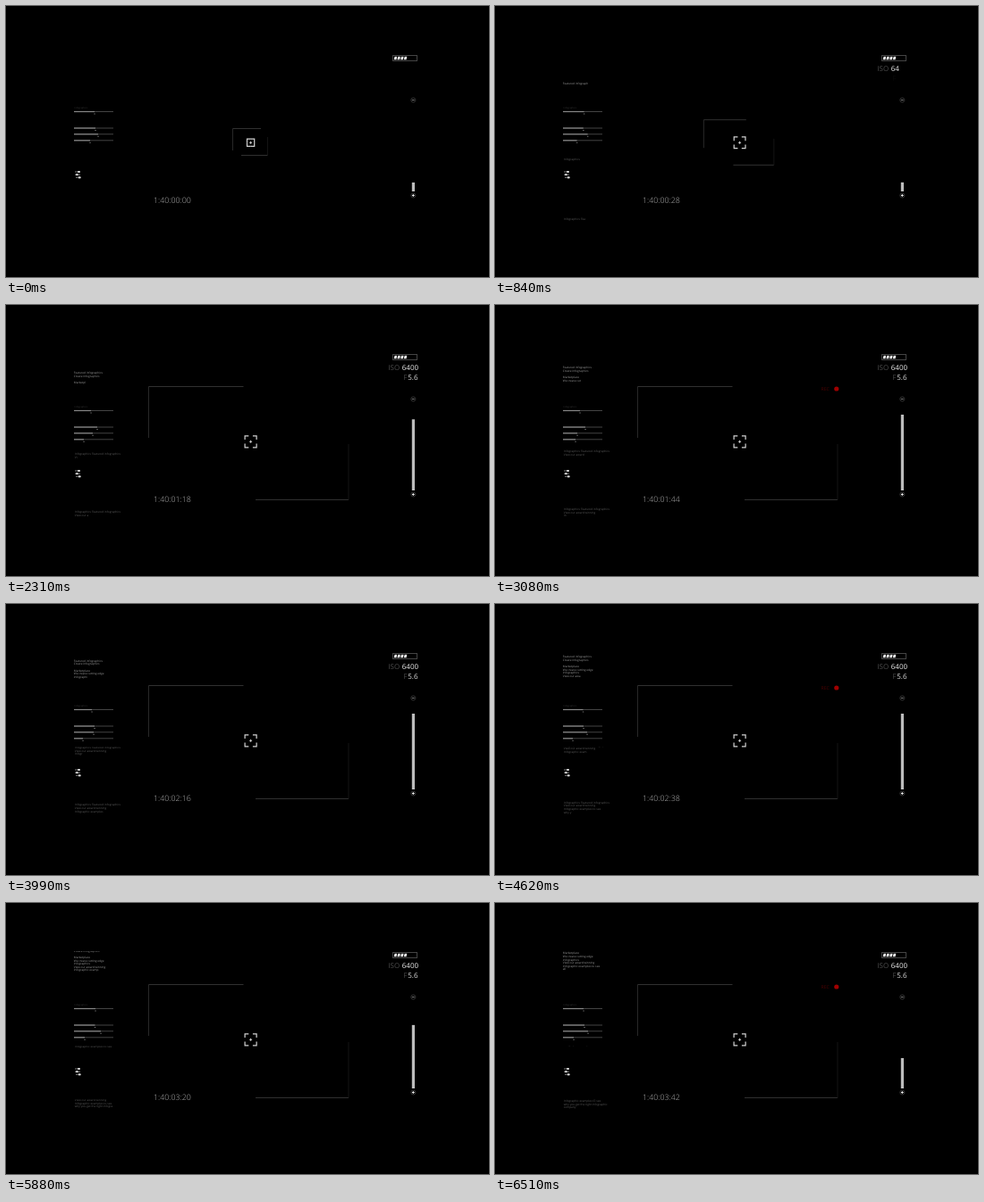
These frames come from a looping animation (540x304 px, 6580 ms). An HTML page with a canvas:

```html
<!DOCTYPE html>
<html lang="en">
<head>
<meta charset="utf-8">
<title>Camera viewfinder</title>
<style>
html, body { margin: 0; width: 100%; height: 100%; overflow: hidden; background: #000; }
canvas { display: block; }
</style>
</head>
<body>
<canvas id="view" width="540" height="304"></canvas>
<script>
const ctx = document.getElementById('view').getContext('2d');
const LOOP = 6580, STEP = 70;
const FONT = '"Open Sans", "Noto Sans", sans-serif';

const clamp = v => Math.max(0, Math.min(1, v));
const lerp = (a, b, p) => a + (b - a) * p;
const span = (t, from, to) => clamp((t - from) / (to - from));
const inOut = p => p < .5 ? 4 * p ** 3 : 1 - 4 * (1 - p) ** 3;

function rect(x, y, w, h, color) {
  ctx.fillStyle = color;
  ctx.fillRect(x, y, w, h);
}

function path(points, color, width = 1) {
  ctx.beginPath();
  points.forEach(([x, y], i) => i ? ctx.lineTo(x, y) : ctx.moveTo(x, y));
  ctx.strokeStyle = color;
  ctx.lineWidth = width;
  ctx.stroke();
}

function text(str, x, y, size, color, weight = 400) {
  ctx.font = `${weight} ${size}px ${FONT}`;
  ctx.fillStyle = color;
  ctx.fillText(str, x, y);
}

// Typed blocks that drift upwards under a fixed top edge
const featured = 'Infographics Featured infographics\nView our award winning\nInfographic examples to see';
const blocks = [
  { x: 75.8, y: 92.6, drift: .00722, top: 54, rate: .0223, color: '#989898',
    copy: 'Featured infographics\nCreate infographics\n\nMarketplace\nWe create cutting edge\ninfographics\nView our award winning\ninfographic examples to see\nall' },
  { x: 76.8, y: 175.2, drift: .00357, top: 160.3, rate: .0162, color: '#585858', copy: featured },
  { x: 76.8, y: 242.1, drift: .00417, top: 220.3, rate: .0197, color: '#585858',
    copy: featured + '\nwhy you get the right infographic\ncompany to' }
];

function drawBlock(b, t) {
  ctx.save();
  ctx.beginPath();
  ctx.rect(70, b.top, 80, 100);
  ctx.clip();
  const lines = b.copy.slice(0, Math.floor(t * b.rate)).split('\n');
  lines.forEach((line, i) => text(line, b.x, b.y - b.drift * t + i * 3.6 + 1, 3.18, b.color));
  ctx.restore();
}

// Slider knobs wander between a few stops
const stops = [0, 1470, 2310, 3080, 3990, 5250, 6510];
const sliders = [
  { y: 118.5, knob: [99, 100, 95, 95, 96, 101, 99] },
  { y: 137, knob: [100, 98, 102, 101, 99, 99, 100] },
  { y: 143.8, knob: [103, 104, 97, 92, 98, 108, 104] },
  { y: 150.8, knob: [94, 90, 87, 90, 86, 88, 88] }
];

function drawSlider({ y, knob }, t) {
  let i = 0;
  while (i < stops.length - 2 && t > stops[i + 1]) i++;
  const p = span(t, stops[i], stops[i + 1]);
  const x = lerp(knob[i], knob[i + 1], p * p * (3 - 2 * p));
  rect(76, y - .5, 44, 1, '#444');
  rect(76, y - .6, x - 76, 1.2, '#868686');
  rect(x - .7, y + 2, 1.5, 1, '#6c6c6c');
}

function drawLeft(t) {
  blocks.forEach(b => drawBlock(b, t));
  text('Infographics', 76.5, 115.3, 2.5, '#363636');
  sliders.forEach(s => drawSlider(s, t));
  [[77, 186, 80.3], [77, 189.2, 78.2], [78, 192.4, 81]].forEach(([x, y, knob]) => {
    rect(x, y - .5, 6, 1, '#777');
    rect(knob, y - 1, 2.4, 2, '#ddd');
  });
}

function drawFrame(t) {
  const p = inOut(span(t, 0, 2230));
  const L = lerp(253.5, 159.5, p), T = lerp(137.5, 91.5, p);
  const R = lerp(292.5, 383, p), B = lerp(167.5, 218.5, p);
  path([[L, lerp(162, 149, p)], [L, T]], '#282828');
  path([[L, T], [lerp(285, 265.5, p), T]], '#303030');
  path([[lerp(263, 279, p), B], [R, B]], '#303030');
  path([[R, B], [R, lerp(147, 156, p)]], '#141414');
}

function drawFocus(t) {
  const cx = 273.6, cy = 153.3, arm = 4.2;
  const half = lerp(4.1, 6.5, inOut(span(t, 0, 1100)));
  for (const sx of [-1, 1]) for (const sy of [-1, 1]) {
    const x = cx + sx * half, y = cy + sy * half;
    path([[x - sx * arm, y], [x, y], [x, y - sy * arm]], '#d4d4d4', 1.2);
  }
  rect(cx - 1.5, cy - .5, 3, 1, '#ccc');
  rect(cx - .5, cy - 1.5, 1, 3, '#ccc');
}

function drawRecord(t) {
  if (Math.floor(t / 900) % 2 === 0) return;
  text('REC', 364.5, 96, 5.2, '#4a0000');
  ctx.beginPath();
  ctx.arc(381.8, 94, 2.6, 0, Math.PI * 2);
  ctx.fillStyle = '#a00000';
  ctx.fill();
}

function drawBattery() {
  ctx.strokeStyle = '#444';
  ctx.lineWidth = 1;
  ctx.strokeRect(432.5, 55.5, 27, 6);
  ctx.fillStyle = '#eee';
  for (let i = 0; i < 4; i++) {
    const x = 433.7 + i * 3.7;
    ctx.beginPath();
    ctx.moveTo(x + .8, 56.7);
    ctx.lineTo(x + 3.5, 56.7);
    ctx.lineTo(x + 2.8, 60.3);
    ctx.lineTo(x, 60.3);
    ctx.fill();
  }
}

function drawExposure(t) {
  const typed = Math.max(0, Math.floor((t - 100) / 115));
  text('ISO'.slice(0, typed), 427.3, 73, 8, '#4c4c4c');
  text('6400'.slice(0, Math.max(0, typed - 4)), 442.8, 73, 8, '#eee');
  const shade = Math.round(68 * span(t, 600, 2200));
  text('F', 444.3, 83.6, 8, `rgb(${shade},${shade},${shade})`);
  text('5.6'.slice(0, Math.max(0, Math.floor((t - 900) / 150))), 449.3, 83.6, 8, '#ddd');
}

function drawZoom(t) {
  const up = inOut(span(t, 674, 2885)), down = inOut(span(t, 4803, 7803));
  const top = 198 - 75 * (up - down);
  rect(453.8, top, 3.2, 208 - top, '#bcbcbc');
  [[105.5, '#777', 0], [212.5, '#eee', 1]].forEach(([y, color, plus]) => {
    ctx.beginPath();
    ctx.arc(455.3, y, 2.5, 0, Math.PI * 2);
    ctx.strokeStyle = '#404040';
    ctx.lineWidth = .8;
    ctx.stroke();
    rect(453.9, y - .5, 2.8, 1, color);
    if (plus) rect(454.8, y - 1.4, 1, 2.8, color);
  });
}

function drawTimer(frame) {
  const count = 2 * Math.round(frame * 1.19);
  const two = n => String(n).padStart(2, '0');
  text(`1:40:${two(Math.floor(count / 60))}:${two(count % 60)}`, 165, 221, 8.9, '#b0b0b0', 300);
}

function draw(now) {
  const frame = Math.floor(now % LOOP / STEP), t = frame * STEP;
  rect(0, 0, 540, 304, '#000');
  drawLeft(t);
  drawFrame(t);
  drawFocus(t);
  drawRecord(t);
  drawBattery();
  drawExposure(t);
  drawZoom(t);
  drawTimer(frame);
}

ctx.textRendering = 'geometricPrecision';
let start;
function tick(now) {
  start ??= now;
  draw(now - start);
  requestAnimationFrame(tick);
}
draw(0);
requestAnimationFrame(tick);
</script>
</body>
</html>
```
